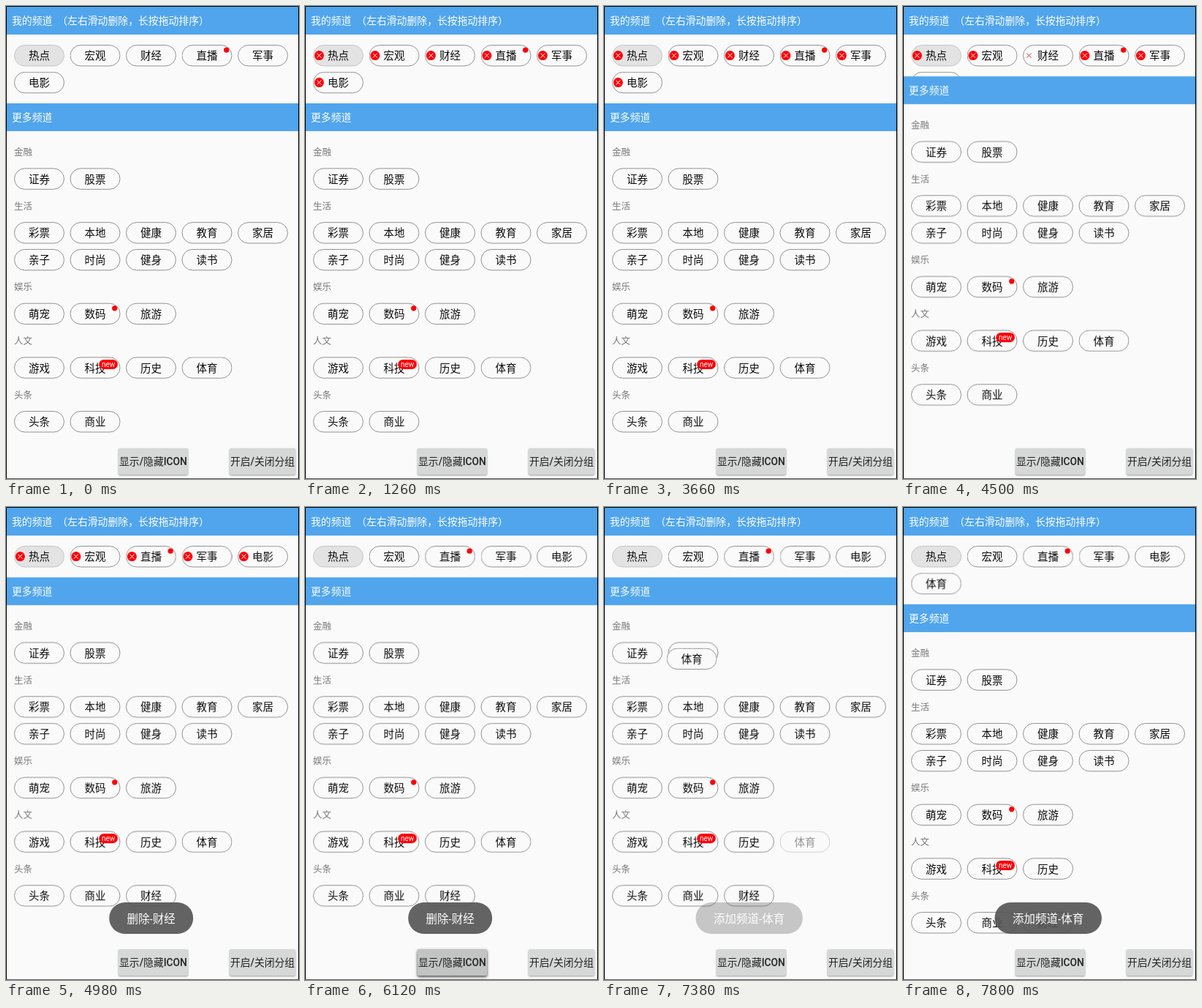
An HTML page for the animation above (8000 ms loop, 401 by 646 pixels).

```html
<!DOCTYPE html>
<html lang="zh-CN">
<head>
<meta charset="utf-8">
<title>频道管理</title>
<style>
  html, body { margin: 0; width: 100%; height: 100%; overflow: hidden; background: #fafafa; }
  svg { display: block; width: 100%; height: 100%; }
  text { font-family: Roboto, "Noto Sans CJK SC", "Noto Sans CJK", sans-serif; white-space: pre; }
  .button { filter: drop-shadow(0 1px 1px #0006); }
  .lifted { filter: drop-shadow(0 2px 2px #0008); }
</style>
</head>
<body>
<svg id="stage" viewBox="0 0 401 646"></svg>
<script>
const LOOP = 8000;
const ROW = 36.85;
const BLUE = '#50a5ec', PAPER = '#fafafa', RED = '#fb0007';
const SMOOTH = 'cubic-bezier(.37,0,.63,1)';
const stage = document.getElementById('stage');

function add(parent, tag, attrs = {}, content) {
  const el = document.createElementNS('http://www.w3.org/2000/svg', tag);
  for (const name in attrs) el.setAttribute(name, attrs[name]);
  if (content) el.textContent = content;
  parent.append(el);
  return el;
}
const group = (parent, attrs) => add(parent, 'g', attrs);
const box = (parent, x, y, width, height, fill, rx = 0, more = {}) =>
  add(parent, 'rect', { x, y, width, height, fill, rx, ...more });
const label = (parent, x, centerY, size, fill, content, more = {}) =>
  add(parent, 'text', { x, y: centerY + size * 0.37, 'font-size': size, fill, ...more }, content);
const middle = { 'text-anchor': 'middle' };

// steps: [time, value, easing towards the next step]; equal times make a hard change
function track(el, prop, steps) {
  const all = [[0, steps[0][1]], ...steps, [LOOP, steps.at(-1)[1]]];
  el.animate(all.map(([time, value, easing = 'linear']) =>
    ({ offset: time / LOOP, [prop]: value, easing })), { duration: LOOP, iterations: Infinity });
}
const shift = (x, y) => `translate(${x}px, ${y}px)`;
const col = i => 11 + 76.5 * i;
const topRow = i => 53 + ROW * i;
const listRow = i => 221.4 + ROW * i;

function cross(parent, color) {
  add(parent, 'path', { d: 'M5.4 11.6l6 6m0-6l-6 6', stroke: color, 'stroke-width': 1 });
}

function chip(parent, name, { x = 0, y = 0, badge, selected } = {}) {
  const g = group(parent, { transform: `translate(${x} ${y})` });
  box(g, .5, .5, 68, 28.4, selected ? '#e3e3e3' : PAPER, 14.2,
    { stroke: selected ? '#c4c4c4' : '#929292' });
  label(g, 34.5, 14.9, 14.5, '#0c0c0c', name, middle);
  if (badge === 'dot') add(g, 'circle', { cx: 61.2, cy: 7.2, r: 3.6, fill: RED });
  if (badge === 'new') {
    box(g, 39.8, 3.6, 25.6, 13, RED, 6.5);
    label(g, 52.6, 9.6, 10, '#fff', 'new', middle);
  }
  return g;
}

function banner(parent, y, content) {
  box(parent, 0, y, 401, 38, BLUE);
  label(parent, 8, y + 19.2, 13.85, '#fff', content);
}

function closeIcon(parent, steps) {
  const icon = group(parent);
  add(icon, 'circle', { cx: 8.4, cy: 14.6, r: 6.5, fill: RED });
  cross(icon, '#fff');
  track(icon, 'opacity', steps);
}
const iconsOn = [[920, 0], [1050, 1], [2030, 1], [2250, 0], [3200, 0], [3330, 1]];
const iconsOff = [[5960, 1], [6100, 0]];

box(stage, 0, 0, 401, 646, PAPER);

// own channels; those after the removed one slide one place back
const top1 = group(stage);
const slide = (el, from, to) => track(el, 'transform', [
  [4640, shift(...from), SMOOTH], [4920, shift(...to)]]);
const own = [['热点', 0], ['宏观', 1], ['直播', 3, 'dot'], ['军事', 4], ['电影', 5]];
own.forEach(([name, slot, badge], i) => {
  const holder = group(top1);
  const place = n => [col(n % 5), topRow(Math.floor(n / 5))];
  slide(holder, place(slot), place(i));
  closeIcon(chip(holder, name, { badge, selected: i === 0 }), [...iconsOn, ...iconsOff]);
});
banner(stage, 1, '我的频道  （左右滑动删除，长按拖动排序）');

// grouped channels
const panel = group(stage);
track(panel, 'transform', [
  [4490, shift(0, 0)], [4490, shift(0, -ROW)],
  [7470, shift(0, -ROW)], [7470, shift(0, 0)]]);
box(panel, 0, 132.9, 401, 560, PAPER);
banner(panel, 132.9, '更多频道');
const sections = [
  ['金融', -1, '证券 股票'],
  ['生活', 1, '彩票 本地 健康 教育 家居 亲子 时尚 健身 读书'],
  ['娱乐', 4, '萌宠 数码 旅游'],
  ['人文', 6, '游戏 科技 历史 体育'],
  ['头条', 8, '头条 商业'],
];
const badges = { 数码: 'dot', 科技: 'new' };
for (const [title, row, names] of sections) {
  label(panel, 11, listRow(row) + 14.8, 12.5, '#777', title);
  names.split(' ').forEach((name, i) => {
    const el = chip(panel, name, {
      x: col(i % 5), y: listRow(row + 1 + Math.floor(i / 5)), badge: badges[name] });
    if (name === '体育') track(el, 'opacity', [[7315, 1], [7430, 0]]);
  });
}

// channel moved down to the list
const removed = group(stage);
track(removed, 'transform', [
  [4550, shift(col(2), topRow(0)), SMOOTH], [4960, shift(col(2), listRow(8))],
  [7470, shift(col(2), listRow(8))], [7470, shift(col(2), listRow(9))]]);
const removedChip = chip(removed, '财经');
closeIcon(removedChip, [...iconsOn, [4490, 1], [4490, 0]]);
const pressed = group(removedChip);
cross(pressed, '#e0382c');
track(pressed, 'opacity', [[4490, 0], [4490, 1], [4960, 1], [4960, 0]]);

// channel moved up to the own list
const added = group(stage);
track(added, 'transform', [
  [7136, shift(col(3), listRow(6) - ROW), SMOOTH], [7536, shift(col(0), topRow(1))]]);
track(added, 'opacity', [[7136, 0], [7136, 1]]);
chip(added, '体育');

function button(x, width, content, presses = []) {
  const lifted = box(stage, x, 604, width, 36, '#d6d7d7', 2, { class: 'lifted', opacity: 0 });
  box(stage, x, 604, width, 36, '#d6d7d7', 2, { class: 'button' });
  const shade = box(stage, x, 604, width, 36, '#000', 2, { opacity: 0 });
  const level = peak => presses.flatMap(([down, up]) =>
    [[down - 30, 0], [down + 60, peak], [up - 5, peak], [up - 5, 0]]);
  if (presses.length) {
    track(lifted, 'opacity', level(1));
    track(shade, 'opacity', level(.09));
  }
  label(stage, x + width / 2, 622.3, 13.8, '#222', content, { ...middle, 'font-weight': 500 });
}
button(154, 95, '显示/隐藏ICON', [[900, 1260], [1980, 2460], [3180, 3660], [5940, 6300]]);
button(306, 90, '开启/关闭分组');

function toast(width, content, steps) {
  const g = group(stage);
  box(g, 198.7 - width / 2, 540, width, 43, 'rgb(83,83,83)', 21.5, { 'fill-opacity': .9 });
  label(g, 198.7, 562, 15.5, '#fff', content, middle);
  track(g, 'opacity', steps);
}
toast(115, '删除-财经', [[4680, 0], [4860, 1], [6580, 1], [6990, 0]]);
toast(146.5, '添加频道-体育', [[7320, 0], [7500, 1]]);

// screen edge
add(stage, 'path', { d: 'M.5 646V.5H400.5V646', fill: 'none', stroke: '#000' });
box(stage, 0, 645, 401, 1, '#555');
</script>
</body>
</html>
```
